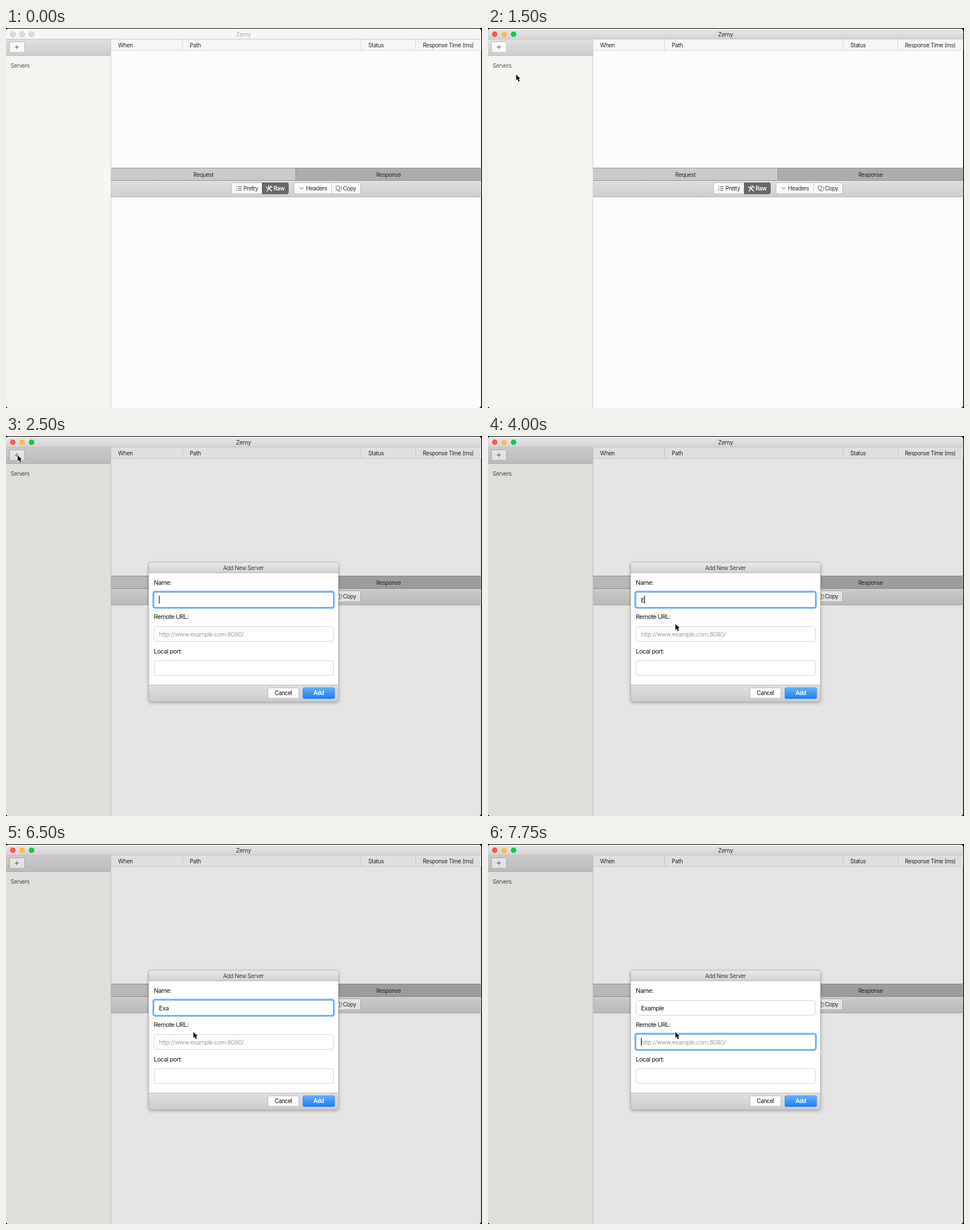
Animation of 837x669 px, one loop 8000 ms. Source, as an HTML page:

```html
<!DOCTYPE html>
<html lang="en">
<head>
<meta charset="utf-8">
<title>Add New Server</title>
<style>
  html, body { margin: 0; width: 100%; height: 100%; overflow: hidden; background: #000; }
  svg { display: block; width: 837px; height: 669px; }
  text { font: 10px Inter, sans-serif; letter-spacing: -.043em; fill: #2b2b2b; white-space: pre; }
  .mid { text-anchor: middle; }
  .form text { font-size: 10.8px; fill: #111; }
  .bold { font-weight: 600; }
  .rule { stroke: #d9d9d9; }
  .button { fill: url(#white); stroke: #bcbcbc; }
  .field { fill: #fff; stroke: #d2d2d2; }
  .icon { fill: none; stroke: #555; }
</style>
</head>
<body>
<svg viewBox="0 0 837 669">
  <defs>
    <linearGradient id="title" x2="0" y2="1"><stop stop-color="#ebe9eb"/><stop offset="1" stop-color="#d2d0d2"/></linearGradient>
    <linearGradient id="bar" x2="0" y2="1"><stop stop-color="#e0dfe0"/><stop offset="1" stop-color="#cecdce"/></linearGradient>
    <linearGradient id="white" x2="0" y2="1"><stop stop-color="#fff"/><stop offset="1" stop-color="#f6f6f6"/></linearGradient>
    <linearGradient id="blue" x2="0" y2="1"><stop stop-color="#62b2fb"/><stop offset="1" stop-color="#1a7cf7"/></linearGradient>
    <clipPath id="window"><rect y="1" width="835.5" height="668" rx="4.5"/></clipPath>
    <filter id="shadow" x="-10%" y="-10%" width="120%" height="120%"><feDropShadow dx="0" dy="2" stdDeviation="3" flood-opacity=".3"/></filter>
  </defs>

  <g clip-path="url(#window)">
    <rect width="836" height="669" fill="#fcfcfc"/>

    <rect id="titlebar" width="836" height="20" y="1"/>
    <path d="M0 19.5H836" stroke="#c4c2c4"/>
    <g id="lights"><circle cx="11.8" cy="11" r="4.8"/><circle cx="28.3" cy="11" r="4.8"/><circle cx="45" cy="11" r="4.8"/></g>
    <text id="appName" class="mid" x="417.5" y="15" style="font-size:10.8px">Zemy</text>

    <rect y="20" width="184" height="649" fill="#f5f5f2"/>
    <rect y="20" width="184" height="28.5" fill="url(#bar)"/>
    <path d="M0 48.5H184" stroke="#b9b9b9"/>
    <path d="M184.5 20V669" stroke="#cfcfcf"/>
    <rect id="plus" class="button" x="6.5" y="24.5" width="26" height="18.5" rx="2"/>
    <path class="icon" d="M15.5 33.5h7M19 30v7"/>
    <text x="8" y="69.5" style="fill:#555">Servers</text>

    <rect x="185" y="20" width="651" height="19.5" fill="#f6f6f4"/>
    <path class="rule" d="M185 39.5H836M310.5 20V39M624.5 20V39M720.5 20V39"/>
    <text x="197" y="33.5">When</text>
    <text x="323" y="33.5">Path</text>
    <text x="637" y="33.5">Status</text>
    <text x="733" y="33.5">Response Time (ms)</text>

    <rect x="185" y="247" width="325" height="21" fill="#cbcacb"/>
    <rect x="510" y="247" width="326" height="21" fill="#adabad"/>
    <path d="M185 246.5H836M509.5 247V268M185 268.5H836" stroke="#969296"/>
    <text class="mid" x="347" y="261.5">Request</text>
    <text class="mid" x="672.5" y="261.5">Response</text>

    <rect x="185" y="269" width="651" height="28.5" fill="url(#bar)"/>
    <path d="M185 297.5H836" stroke="#b9b7b9"/>
    <rect class="button" x="396.5" y="272.5" width="100" height="19.5" rx="2.5"/>
    <path d="M450.5 272.5h43.5a2.5 2.5 0 0 1 2.5 2.5v14.5a2.5 2.5 0 0 1-2.5 2.5h-43.5z" fill="#696869" stroke="#626162"/>
    <rect class="button" x="506.5" y="272.5" width="117" height="19.5" rx="2.5"/>
    <path d="M572.5 273v18.5" stroke="#c4c4c4"/>
    <path class="icon" d="M405 279.5h1.5M408 279.5h6M405 282.5h1.5M408 282.5h6M405 285.5h1.5M408 285.5h6"/>
    <path d="M458.5 287.5l7-7.5m-1-2.5l4 4M467.500 287.5l-6-6m-3.500-2c0 2 2 3 3.500 2s1-3-.5-3.700" fill="none" stroke="#fff" stroke-width="1.5"/>
    <path class="icon" d="M516.500 280.500l3.300 3.300 3.300-3.300"/>
    <path class="icon" d="M580 278.500l5.500-1.500 1.500 7-5.500 1.500zM587 280h3.500v4.500l-2.500 2.500h-4.500v-2" stroke-width=".8"/>
    <text x="417.500" y="285.700">Pretty</text>
    <text class="bold" x="470.500" y="285.700" style="fill:#fff">Raw</text>
    <text x="527.500" y="285.700">Headers</text>
    <text x="592.500" y="285.700">Copy</text>

    <g id="dialog" class="form">
      <rect y="20" width="836" height="649" opacity=".095"/>
      <rect x="251" y="222.500" width="333.500" height="245" rx="3" fill="#fff" filter="url(#shadow)"/>
      <path d="M251 241v-15.500a3 3 0 0 1 3-3h327.500a3 3 0 0 1 3 3v15.500z" fill="url(#title)"/>
      <path d="M251 438.500h333.500v26a3 3 0 0 1-3 3h-327.500a3 3 0 0 1-3-3z" fill="url(#bar)"/>
      <path d="M251 241h333.500M251 438.500h333.500" stroke="#bab8ba"/>
      <rect x="251" y="222.500" width="333.500" height="245" rx="3" fill="none" stroke="#aaa" stroke-width=".7"/>
      <text class="mid" x="417.500" y="235.500" style="font-size:10px;fill:#444">Add New Server</text>

      <text x="260" y="262">Name:</text>
      <text x="260" y="322">Remote URL:</text>
      <text x="260" y="382.500">Local port:</text>
      <rect class="field" x="260.500" y="275.500" width="315" height="26" rx="3"/>
      <rect class="field" x="260.500" y="335.500" width="315" height="26" rx="3"/>
      <rect class="field" x="260.500" y="395.500" width="315" height="26" rx="3"/>
      <rect id="ring" x="259" y="274" width="317.500" height="28.500" rx="3" fill="none" stroke="#70b1f8" stroke-width="3"/>
      <text id="name" x="269" y="292.500"></text>
      <text x="269" y="352.500" style="fill:#a0a0a0">http://www.example.com:8080/</text>
      <rect id="caret" y="281" width="1" height="14"/>

      <rect class="button" x="460.500" y="443.500" width="54.500" height="18.500" rx="2.500"/>
      <text class="mid" x="487.700" y="456.300" style="font-size:10px">Cancel</text>
      <rect x="522" y="443" width="56" height="19.500" rx="2.500" fill="url(#blue)" stroke="#3486ee" stroke-width=".6"/>
      <text class="mid bold" x="550" y="456.300" style="font-size:10px;fill:#fff">Add</text>
    </g>
  </g>
  <path id="cursor" d="M0 0V10.200L2.400 8L4.200 12.300L6.200 11.400L4.300 7.300H7.500Z" stroke="#fff" stroke-width="1.600" paint-order="stroke"/>
</svg>
<script>
  const LOOP = 8000;
  const $ = id => document.getElementById(id);

  // [start ms, tip x, tip y]
  const moves = [
    [0, -50, -50], [250, 514.5, 1], [500, 440.5, 121], [1250, 84.5, 98], [1500, 49.5, 82],
    [1750, 27.5, 53], [2000, 20.5, 34], [3000, 329.5, 331]
  ];
  // [start ms, typed text, caret visible]
  const typing = [
    [0, '', 1], [3500, '', 0], [4000, 'E', 1], [4500, 'Ex', 1], [4750, 'Exm', 1], [5250, 'Exm', 0],
    [5750, 'Ex', 1], [6000, 'Exa', 1], [6500, 'Exa', 0], [6750, 'Exam', 1], [7000, 'Examp', 1], [7250, 'Example', 1]
  ];
  const current = (steps, t) => steps.findLast(step => step[0] <= t);

  function draw(t) {
    const active = t >= 750;
    const onUrl = t >= 7750;
    $('titlebar').style.fill = active ? 'url(#title)' : '#f6f6f5';
    $('appName').style.fill = active ? '#333' : '#b9aab4';
    ['#fc5753', '#fdbc40', '#14c64c'].forEach((color, i) => {
      const light = $('lights').children[i];
      light.style.fill = active ? color : '#dddcdd';
      light.style.stroke = active ? 'none' : '#c9c8c9';
    });
    $('plus').style.fill = t >= 2250 && t < 2500 ? '#dededd' : '';

    const [, x, y] = current(moves, t);
    $('cursor').setAttribute('transform', `translate(${x} ${y})`);

    $('dialog').style.display = t >= 2500 ? '' : 'none';
    if (t < 2500) return;
    const [, text, caretOn] = current(typing, t);
    $('name').textContent = text;
    const end = onUrl || !text ? 0 : $('name').getComputedTextLength();
    const drop = onUrl ? 60 : 0;
    $('caret').setAttribute('transform', `translate(${269 + Math.round(end)} ${drop})`);
    $('caret').style.visibility = caretOn ? 'visible' : 'hidden';
    $('ring').setAttribute('transform', `translate(0 ${drop})`);
  }

  const start = performance.now();
  function tick() {
    draw((performance.now() - start) % LOOP);
    requestAnimationFrame(tick);
  }
  tick();
</script>
</body>
</html>
```
